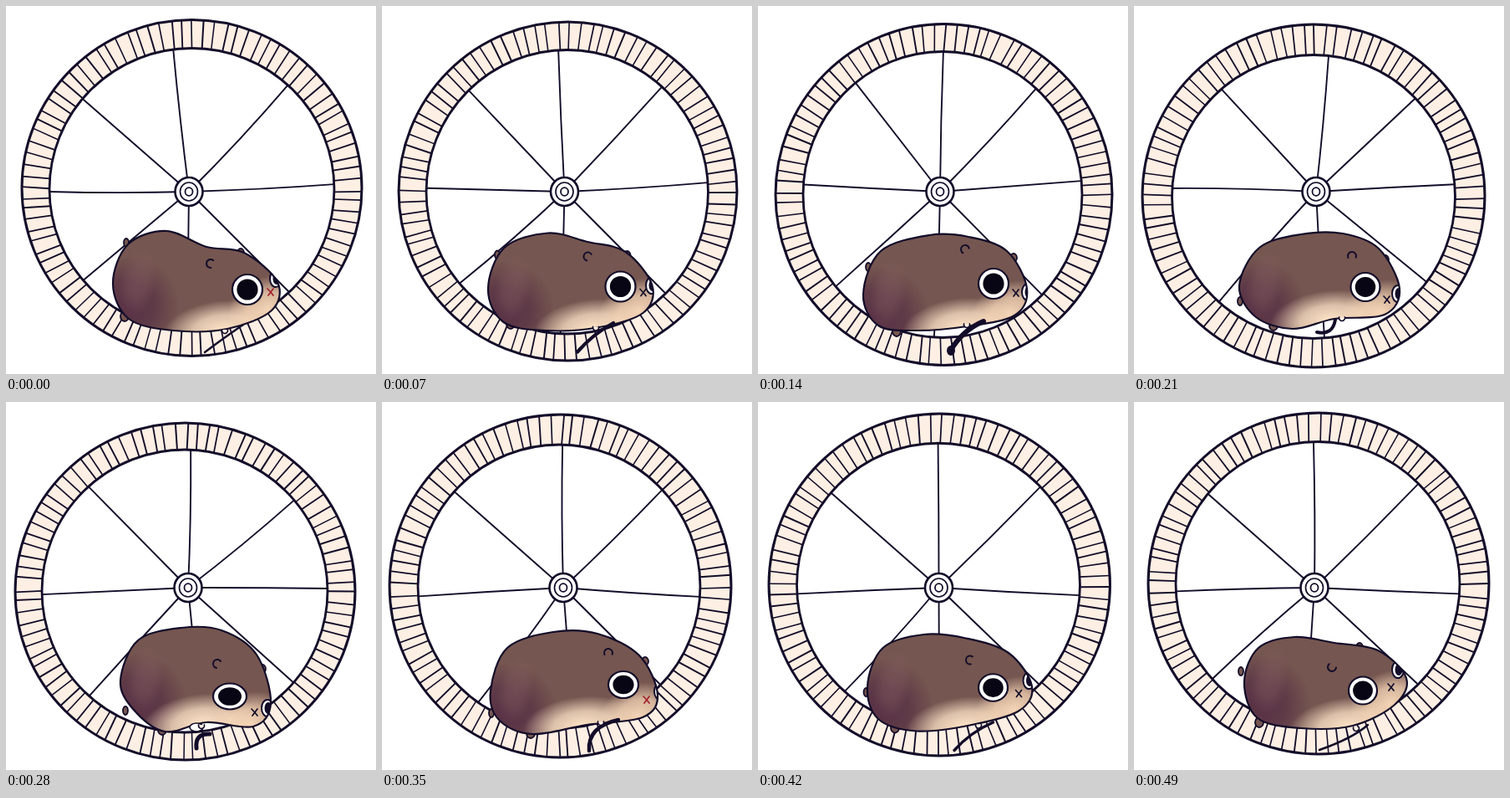
Recreate the animation shown at these times as an HTML page with a canvas. Size 443 px wide and 440 px high, loop 0.56 s.

```html
<!DOCTYPE html>
<html lang="en">
<head>
<meta charset="utf-8">
<title>Hamster wheel</title>
<style>
html, body { margin: 0; width: 100%; height: 100%; overflow: hidden; background: #fff; }
canvas { display: block; }
</style>
</head>
<body>
<canvas id="stage" width="443" height="440"></canvas>
<script>
const ctx = document.getElementById('stage').getContext('2d');
const INK = '#130c29', CREAM = '#fdefe3', BROWN = '#755650', RED = '#a3202c';
const STEP = 70, SLATS = 92, TAU = Math.PI * 2;

// Outer rim x, y, rx, ry, then inner rim x, y, rx, ry.
const rims = [
  [222.5, 217.5, 203.5, 201, 222.5, 219, 170.5, 168.5],
  [222.5, 225.5, 201.5, 204, 221, 225.5, 167, 171],
  [215, 227, 205, 205, 215, 228, 169.5, 169.5],
  [214.5, 226.5, 203.5, 201.5, 214, 226, 171, 169],
  [213.5, 220, 204.5, 205, 212, 220.5, 169, 169.5],
  [221, 217, 204, 204, 220, 217.5, 170, 170]
];

// Where the eight spokes meet the inner rim, in degrees.
const spokes = [
  [-97.5, -47.6, -2, 46.9, 92, 139.7, 179, 219.9],
  [-89.7, -47.9, -5.5, 44.5, 93.5, 140, 184, 231.4],
  [-83.9, -44, -5, 37, 85.6, 132, 183.4, 229.4],
  [-87.6, -40, -1, 40.4, 83, 132, 178.6, 227.6],
  [-88.6, -43, 4.2, 44, 84, 125, 176, 222],
  [-91.7, -44.8, 4, 45, 95, 138, 177, 219.3]
];
const hubs = [[219, 222], [218, 222], [218, 222], [218, 222], [217, 222], [216, 222]];

// Outline from the rump over the back to the muzzle and along the belly.
const bodies = [
  [128, 332, 146, 285, 192, 269, 240, 288, 285, 295, 325, 330, 318, 364, 265, 386, 200, 388, 147, 374],
  [126, 345, 147, 293, 205, 274, 252, 276, 298, 293, 322, 338, 307, 370, 250, 383, 190, 388, 144, 382],
  [126, 335, 150, 289, 200, 273, 250, 272, 293, 290, 318, 338, 300, 369, 240, 374, 190, 386, 146, 372],
  [137, 333, 158, 285, 210, 270, 258, 273, 300, 302, 317, 360, 296, 388, 240, 383, 190, 394, 152, 367],
  [130, 345, 150, 294, 205, 275, 258, 277, 308, 303, 330, 350, 312, 377, 245, 386, 180, 397, 140, 380],
  [132, 335, 149, 294, 192, 281, 240, 288, 292, 297, 326, 330, 312, 362, 262, 387, 200, 390, 148, 378]
];

// Eye x, y, rx, ry; far eye x, y; nose x, y; ear x, y, direction.
const faces = [
  [289, 339, 18, 18, 323, 326, 317, 342, 245, 308, 200],
  [282, 332, 18, 18, 323, 342, 309, 343, 248, 291, 235],
  [277, 336, 17.5, 17, 316, 344, 303, 351, 261, 299, 270],
  [268, 352, 20, 15.5, 313, 366, 298, 371, 253, 313, 215],
  [289, 338, 18, 16, 333, 346, 317, 356, 271, 300, 270],
  [274, 345, 17, 16.5, 316, 320, 308, 341, 237, 317, 120]
];

// Tail x, y; hind foot x, y; far ear x, y; front paw x, y.
const details = [
  [144, 283, 142, 371, 281, 295, 262, 388],
  [132, 312, 166, 389, 306, 301, 250, 381],
  [127, 353, 167, 382, 301, 303, 249, 373],
  [143, 369, 187, 392, 307, 319, 234, 387],
  [131, 372, 178, 396, 315, 310, 262, 383],
  [128, 322, 150, 383, 270, 293, 266, 390]
];

// Reaching leg: start, control, end, width.
const legs = [
  [284, 381, 262, 396, 238, 414, 2.5],
  [270, 377, 244, 388, 230, 413, 6],
  [241, 375, 238, 394, 219, 390, 4],
  [244, 397, 226, 396, 228, 414, 5],
  [283, 380, 246, 388, 248, 417, 4.5],
  [280, 386, 262, 402, 222, 416, 2.5]
];

const timeline = [0, 0.5, 1, 2, 3, 4, 4.5, 5];

function poseOf(table, at) {
  const from = table[Math.floor(at)], to = table[Math.ceil(at)], part = at % 1;
  return from.map((v, i) => v + (to[i] - v) * part);
}

function randomFrom(seed) {
  return () => {
    const v = Math.sin(seed++ * 127.1 + 31.7) * 43758.5453;
    return v - Math.floor(v);
  };
}

function stroke(width, color = INK) {
  ctx.lineWidth = width;
  ctx.strokeStyle = color;
  ctx.stroke();
}

function ellipse(x, y, rx, ry, fill, width = 0) {
  ctx.beginPath();
  ctx.ellipse(x, y, rx, ry, 0, 0, TAU);
  if (fill) { ctx.fillStyle = fill; ctx.fill(); }
  if (width) stroke(width);
}

function curve(x1, y1, cx, cy, x2, y2, width, color) {
  ctx.beginPath();
  ctx.moveTo(x1, y1);
  ctx.quadraticCurveTo(cx, cy, x2, y2);
  stroke(width, color);
}

const onEllipse = (x, y, rx, ry, a) => [x + rx * Math.cos(a), y + ry * Math.sin(a)];

function smoothPath(flat) {
  const n = flat.length / 2;
  const pt = i => { const k = (i + n) % n * 2; return [flat[k], flat[k + 1]]; };
  const path = new Path2D();
  path.moveTo(...pt(0));
  for (let i = 0; i < n; i++) {
    const [a, b, c, d] = [pt(i - 1), pt(i), pt(i + 1), pt(i + 2)];
    path.bezierCurveTo(
      b[0] + (c[0] - a[0]) / 6, b[1] + (c[1] - a[1]) / 6,
      c[0] - (d[0] - b[0]) / 6, c[1] - (d[1] - b[1]) / 6, c[0], c[1]);
  }
  return path;
}

// Soft elliptical tint, strongest in its middle.
function glow(x, y, rx, ry, rgb, alpha, tilt = 0) {
  ctx.save();
  ctx.translate(x, y);
  ctx.rotate(tilt);
  ctx.scale(rx, ry);
  const g = ctx.createRadialGradient(0, 0, 0, 0, 0, 1);
  g.addColorStop(0, `rgba(${rgb},${alpha})`);
  g.addColorStop(0.5, `rgba(${rgb},${alpha * 0.75})`);
  g.addColorStop(1, `rgba(${rgb},0)`);
  ctx.fillStyle = g;
  ctx.fillRect(-1, -1, 2, 2);
  ctx.restore();
}

function drawWheel(at, seed) {
  const rim = poseOf(rims, at), outer = rim.slice(0, 4), inner = rim.slice(4);
  const [hx, hy] = poseOf(hubs, at), random = randomFrom(seed * 200 + 1);
  ellipse(...outer, CREAM, 3);
  ellipse(...inner, '#fff', 2.8);
  for (let i = 0; i < SLATS; i++) {
    const a = (i + random() * 0.3) / SLATS * TAU;
    ctx.beginPath();
    ctx.moveTo(...onEllipse(...inner, a));
    ctx.lineTo(...onEllipse(...outer, a + (random() - 0.5) * 0.012));
    stroke(1.5 + random() * 0.5);
  }
  for (const degrees of poseOf(spokes, at)) {
    const [x, y] = onEllipse(...inner, degrees * Math.PI / 180);
    const bend = (random() - 0.5) * 5;
    curve(hx, hy, (hx + x) / 2 + bend, (hy + y) / 2 + bend, x, y, 1.9);
  }
  ellipse(hx, hy, 16.5, 17, '#fff', 2.6);
  ellipse(hx, hy, 10.5, 11, '#fff', 1.7);
  ellipse(hx, hy, 4.5, 4.8, '#fff', 1.8);
}

function drawHamster(at) {
  const body = poseOf(bodies, at), path = smoothPath(body);
  const [ex, ey, erx, ery, fx, fy, nx, ny, ax, ay, turn] = poseOf(faces, at);
  const [tx, ty, hx, hy, ox, oy, px, py] = poseOf(details, at);
  const [left, rumpY] = body, [chinX, chinY] = body.slice(12), [bellyX, bellyY] = body.slice(14);

  ellipse(tx, ty, 3, 5, BROWN, 1.8);
  ellipse(hx, hy, 5, 6, BROWN, 1.8);
  ellipse(ox, oy, 4, 5, BROWN, 1.8);

  ctx.save();
  ctx.clip(path);
  ctx.fillStyle = BROWN;
  ctx.fillRect(100, 250, 250, 160);
  glow(left + 18, rumpY + 28, 62, 62, '82,42,66', 0.85);
  glow(left + 30, rumpY - 2, 22, 42, '137,98,99', 0.45, 0.2);
  glow(bellyX - 5, bellyY + 2, 72, 36, '255,229,200', 1, -0.1);
  glow(chinX - 5, chinY - 2, 50, 38, '250,218,186', 0.95, -0.4);
  ellipse(fx, fy, 7, 10, '#fff', 2);
  ellipse(fx + 1, fy, 4.5, 7, INK);
  ctx.restore();
  ctx.lineWidth = 2.2;
  ctx.strokeStyle = INK;
  ctx.stroke(path);

  ellipse(ex, ey, erx, ery, '#fff', 2.2);
  ellipse(ex, ey, erx * 0.7, ery * 0.7, '#080614');

  const noseColor = at === 0 || at === 4 ? RED : INK;
  curve(nx - 4, ny - 4, nx, ny, nx + 3, ny + 4, 1.7, noseColor);
  curve(nx + 3, ny - 4, nx, ny, nx - 3, ny + 4, 1.7, noseColor);

  const a = turn * Math.PI / 180;
  ctx.beginPath();
  ctx.arc(ax, ay, 5, a - 2, a + 1.9);
  stroke(2);

  const leg = poseOf(legs, at);
  curve(...leg);
  if (leg[6] > 5.5) ellipse(leg[4] + 1, leg[5] - 1, 5, 6, INK);
  if (at === 3) ellipse(px - 6, py + 2, 8, 5, '#fff', 1.6);
  ctx.beginPath();
  ctx.arc(px, py, 3.5, -0.3, Math.PI + 0.3);
  ctx.fillStyle = CREAM;
  ctx.fill();
  stroke(1.7);
}

function draw() {
  const index = Math.floor(performance.now() / STEP) % timeline.length;
  const at = timeline[index];
  ctx.fillStyle = '#fff';
  ctx.fillRect(0, 0, 443, 440);
  ctx.lineCap = ctx.lineJoin = 'round';
  drawWheel(at, index);
  drawHamster(at);
  requestAnimationFrame(draw);
}
draw();
</script>
</body>
</html>
```
